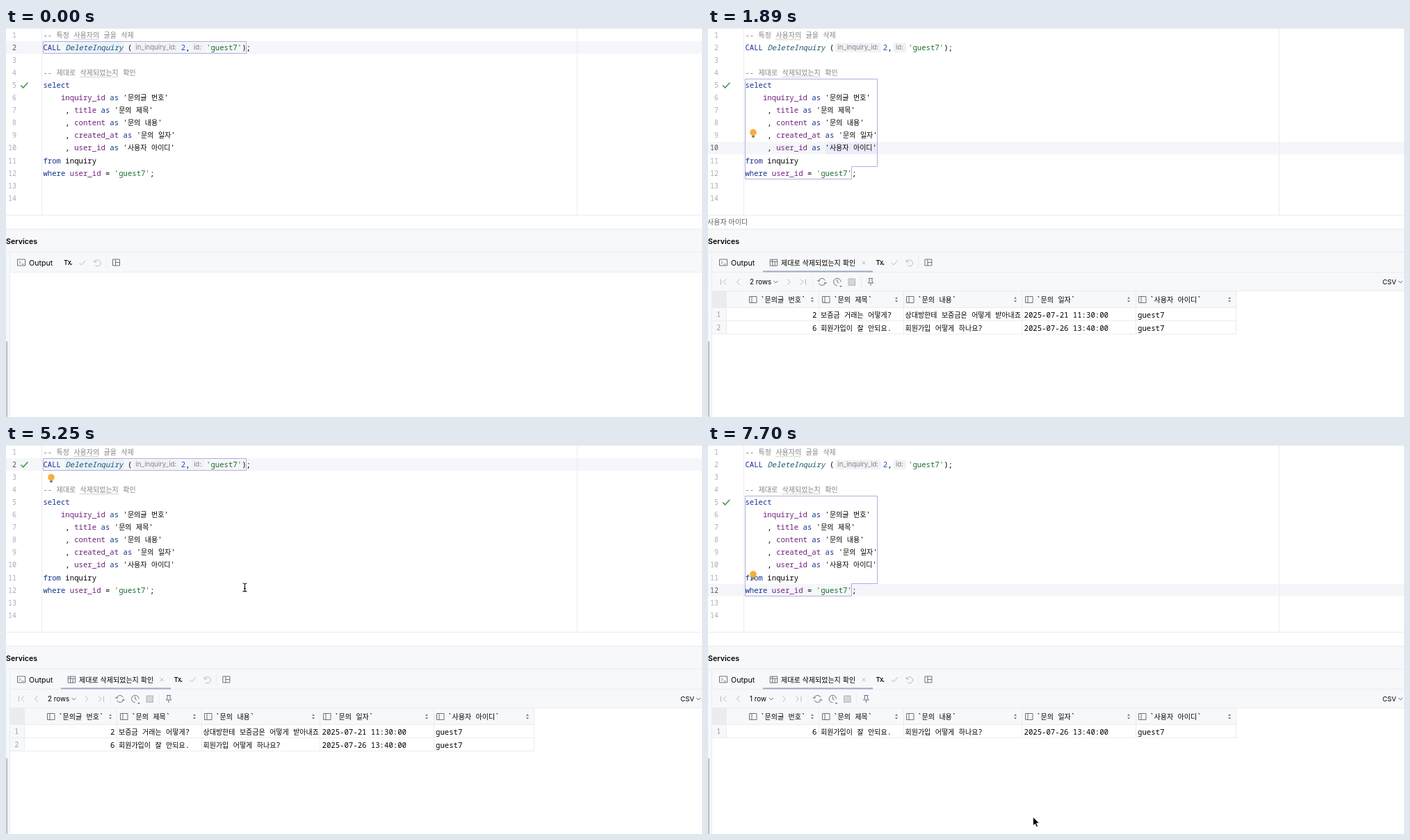
Write an HTML page that moves like this. It is 1001 by 560 pixels and loops after 7770 ms.

```html
<!DOCTYPE html>
<html lang="ko">
<head>
<meta charset="utf-8">
<title>SQL console</title>
<style>
html, body { margin: 0; width: 100%; height: 100%; overflow: hidden; background: #fff }
svg { display: block }
text { white-space: pre; font: 10.67px Inter, 'Noto Sans CJK KR', 'Noto Sans CJK', sans-serif }
.m { font-family: 'Noto Sans Mono', 'Noto Sans CJK KR', 'Noto Sans CJK', monospace; font-weight: 500 }
.h { font-family: 'Noto Sans CJK KR', 'Noto Sans CJK', sans-serif; font-size: 10px; font-weight: 400 }
.k { fill: #14348f } .f { fill: #6f1f7c } .s { fill: #1b6e2c }
.c { fill: #858585; font-weight: 400 }
.i { fill: #17586b; font-style: italic }
.n { font-size: 10px; font-weight: 400; text-anchor: end; fill: #aaadb6 }
.n.on { fill: #555962 }
.hint { font-size: 9.6px; fill: #7f838a }
.b { font-weight: 600 }
.ic { fill: none; stroke: #6c707e }
.off { fill: none; stroke: #b4b8c2 }
#popup { filter: drop-shadow(0 3px 5px #0005) }
</style>
</head>
<body>
<svg id="stage" width="1001" height="560" viewBox="0 0 1001 560"></svg>
<script>
const LOOP = 7770, STEP = 70;
const $ = id => document.getElementById(id);
const lineTop = n => 1 + 18.08 * (n - 1);

const ko = s => s.replace(/[가-힣]+/g, '<tspan class="h">$&</tspan>');
const paint = s => ko(s.replace(
  /\b(CALL|select|as|from|where)\b|(\w+_(?:id|at)|title|content)|(DeleteInquiry)|('guest7')/g,
  (m, ...g) => `<tspan class="${'kfis'[g.findIndex(Boolean)]}">${m}</tspan>`));
const text = (x, y, s, cls = '', extra = '') => `<text x="${x}" y="${y}" class="${cls}" ${extra}>${s}</text>`;
const mono = (x, y, s, cls = '', extra = '') => text(x, y, paint(s), 'm ' + cls, extra);
const rect = (x, y, w, h, fill, extra = '') => `<rect x="${x}" y="${y}" width="${w}" height="${h}" fill="${fill}" ${extra}/>`;
const path = (d, cls = 'ic', extra = '') => `<path d="${d}" class="${cls}" ${extra}/>`;
const group = (id, body) => `<g id="${id}">${body}</g>`;
const hline = (y, x = 0, w = 1001) => rect(x, y, w, 1, '#ebecf0');
const vline = (x, y, h) => rect(x, y, 1, h, '#ebecf0');
const wave = (x, y, w) => path(`M${x} ${y}` + 'q1 -1.6 2 0t2 0'.repeat(w / 4), '', 'fill="none" stroke="#b5c7ae" stroke-width=".8"');

const code = [
  '-- 특정 사용자의 글을 삭제', '', '', '-- 제대로 삭제되었는지 확인', 'select',
  "    inquiry_id as '문의글 번호'", "     , title as '문의 제목'", "     , content as '문의 내용'",
  "     , created_at as '문의 일자'", "     , user_id as '사용자 아이디'",
  'from inquiry', "where user_id = 'guest7';", '', ''];

const editor =
  rect(0, 0, 1001, .6, '#d5d6da') +
  rect(0, 0, 1001, 18, '#f5f6f9', 'id="band"') +
  rect(85, 20, 84, 16, '#e9f0fa', 'id="callMark"') + rect(169, 164.5, 74, 17, '#ecebfa', 'id="nameMark"') +
  path('', '', 'id="sel" fill="#c9c9fe"') +
  vline(51, 0, 269) + vline(821, 0, 269) + hline(269) +
  path('', '', 'id="outline" fill="none" stroke="#b5acdd"') +
  rect(183, 21.5, 66, 13.5, '#f1f2f5', 'rx="3"') + rect(266.5, 21.5, 18.5, 13.5, '#f1f2f5', 'rx="3"') +
  code.map((s, i) => {
    const y = lineTop(i + 1) + 12.7;
    return text(15, y, i + 1, 'm n') + mono(53.4, y, s, s.startsWith('--') ? 'c' : '');
  }).join('') +
  mono(53.4, 31.8, 'CALL DeleteInquiry (') + text(186.5, 31.3, 'in_inquiry_id:', 'hint') +
  mono(251.8, 31.8, '<tspan fill="#1f4fc4">2</tspan>,') + text(270, 31.3, 'id:', 'hint') +
  mono(288, 31.8, "'guest7');") +
  wave(97, 16.5, 36) + wave(106, 70.5, 56) +
  path('M21.3 0l3.4 3.3l6.6 -7.2', '', 'id="check" fill="none" stroke="#4f9a52" stroke-width="1.7"') +
  group('bulb', '<circle r="4.8" cy="-1" fill="#f4af3d"/>' + rect(-2, 3.5, 4, 3, '#8b8176', 'rx="1"')) +
  rect(0, 0, 1.6, 15.5, '#000', 'id="caret"') +
  text(-1, 283, ko('사용자 아이디'), '', 'id="crumb" fill="#5a5d66"');

const table = path('M0 -4.5h10.5v9h-10.5zM0 -1.5h10.5M3.5 -4.5v9M7 -1.5v6');
const tools =
  text(83, 341, 'Tx', '', 'style="font-size:9.5px;font-weight:500"') + path('M92.5 339.5h3l-1.5 2z', '', 'fill="#333"') +
  path('M105.5 338l3 3l6 -6.5M127 333.5v3.5h3.5M127.5 336.5a4.5 4.5 0 1 1 1 5.2', 'off') +
  vline(144, 330, 16) + path('M153.5 333h10v9h-10zM157.5 333v9M157.5 337.5h6');

const services =
  hline(289) + rect(0, 290, 1001, 62, '#f7f8fa') + hline(322) + hline(351) +
  rect(0, 323, 5, 237, '#f7f8fa') + vline(5, 323, 237) + rect(0, 451, 2.4, 109, '#c3c4c8', 'rx="1"') +
  text(0, 310.5, 'Services', 'b') +
  path('M16.5 333h11v9h-11zM19 335.5l2 2l-2 2M22.5 340h3') + text(33, 341.7, 'Output') +
  group('tools', tools) +
  group('tab', rect(79, 349.5, 158, 2, '#9da9c8') + `<g transform="translate(89.2 337.7)">${table}</g>` +
    text(105, 341.7, ko('제대로 삭제되었는지 확인')) + path('M221.5 335.5l5 5m0 -5l-5 5', 'off'));

const heads = [[59.5, 150, '문의글 번호'], [164.5, 271, '문의 제목'], [285.5, 442, '문의 내용'],
  [456.5, 605, '문의 일자'], [619.5, 750, '사용자 아이디']];
const cols = [26, 159, 281, 451, 615, 759];
const record = (n, id, ...cells) => {
  const y = 416.5 + 19 * (n - 1);
  return text(12.3, y - .2, n, 'm', 'fill="#9a9eaa" style="font-size:10px"') +
    mono(156.5, y, id, '', 'text-anchor="end"') +
    cells.map((s, i) => text([162, 283.5, 454.5, 618][i], y, ko(s), 'm', i == 1 ? 'clip-path="url(#cell)"' : '')).join('');
};
const frame = n => rect(6, 403, 20, 19 * n, '#f7f8fa') +
  cols.map(x => vline(x, 378, 25 + 19 * n)).join('') +
  [402, 421, 440].slice(0, n + 1).map(y => hline(y, 6, 754)).join('');
const second = ['6', '회원가입이 잘 안되요.', '회원가입 어떻게 하나요?', '2025-07-26 13:40:00', 'guest7'];

const results =
  '<clipPath id="cell"><rect x="281" y="400" width="169" height="45"/></clipPath>' +
  rect(6, 352, 995, 26, '#f7f8fa') + rect(6, 378, 754, 25, '#f7f8fa') + rect(6, 378, 20, 25, '#ebecf0') + hline(378, 6, 995) +
  path('M18.5 361.5v8M26 361.5l-4 4l4 4M45.5 361.5l-4 4l4 4', 'off') +
  text(60, 369, '', '', 'id="count" style="font-size:9.8px"') +
  group('nav', path('M94.5 364l3 3l3 -3') +
    path('M114 361.5l4 4l-4 4M133 361.5l4 4l-4 4M140.5 361.5v8', 'off') + vline(150, 358, 16) +
    path('M159 364.5a5 5 0 0 1 9.5 -1M169 366.5a5 5 0 0 1 -9.5 1M157 363l2 2l2.3 -1.5M171 368l-2 -2l-2.3 1.5') +
    path('M191 365.5a5.2 5.2 0 1 0 -5.2 5.2M185.8 362v3.8l2.5 1.5') + path('M189 371h4l-2 2z', '', 'fill="#6c707e"') +
    rect(202, 361, 9.5, 9.5, '#d3d5db', 'stroke="#b4b8c2"') + vline(220, 358, 16) +
    path('M231 360.5h6M232 360.5v4.5l-2 2h8l-2 -2v-4.5M234 367v4')) +
  text(970, 369, 'CSV', '', 'style="font-size:9.6px"') + path('M993 364l3 3l3 -3') +
  heads.map(([x, s, name]) =>
    path(`M${x} 386.5h10.5v9h-10.5zM${x + 3.5} 386.5v9`) + mono(x + 15.7, 394.5, '`' + name + '`') +
    path(`M${s - 2} 389.8l2 -2.5l2 2.5zM${s - 2} 392.2l2 2.5l2 -2.5z`, '', 'fill="#6c707e"')).join('') +
  group('two', frame(2) + record(1, '2', '보증금 거래는 어떻게?', '상대방한테 보증금은 어떻게 받아내죠?', '2025-07-21 11:30:00', 'guest7') + record(2, ...second)) +
  group('one', frame(1) + record(1, ...second));

const spinner = Array.from({ length: 8 }, (_, i) =>
  `<path d="M0 -5V-9.5" transform="rotate(${45 * i})" stroke="#6c707e" stroke-width="2.2" stroke-linecap="round" opacity="${.2 + i * .1}"/>`).join('');

const popup = rect(0, 0, 290.5, 93.5, '#fff', 'rx="6" stroke="#c4c6cc" stroke-width=".6"') +
  rect(.3, 31.5, 290, 20, '#d4e2ff') +
  path('M.3 77.5h290v10q0 6 -6 6h-278q-6 0 -6 -6z', '', 'fill="#f7f8fa"') +
  text(147, 20, 'Statements', 'b', 'text-anchor="middle"') + text(1, 45.7, '', '', 'id="first"') +
  text(1, 65.7, ko("-- 특정 사용자의 글을 삭제 CALL DeleteInquiry (2,'guest7'); ...")) +
  text(2.5, 89, 'Customize', '', 'fill="#315fbd"');

const mouse =
  '<circle id="ring" r="13.3" fill="#fff" fill-opacity=".6" stroke="#111" stroke-width="1.4"/>' +
  path('M-3 -6q2.5 0 3 1.2q.5 -1.2 3 -1.2M0 -5V5M-3 6q2.5 0 3 -1.2q.5 1.2 3 1.2M-1.5 1.5h3', '', 'id="beam" fill="none" stroke="#111" stroke-width="1.2"') +
  path('M0 0V12.5l2.9 -2.6l2 4.5l2.1 -1l-2 -4.3h3.8z', '', 'id="arrow" fill="#000" stroke="#fff" stroke-width=".8"');

$('stage').innerHTML = editor + services + group('results', results) + group('spin', spinner) +
  group('popup', popup) + group('mouse', mouse);

// Mouse trips: [time, x, y] points; the last time hides the pointer.
const trips = [
  [[70, 495, 485], [210, 425, 330], [350, 330, 176], [490, 330, 176]],
  [[2520, 335, 204], [2660, 362, 150], [2870, 428, 28], [2940, 429.3, 25.5], [3010, 442, 21], [3080, 442, 20]],
  [[4760, 442, 20], [4900, 461, 16], [5110, 395, 130], [5250, 343.5, 205], [5460, 343.5, 206], [5530, 343.5, 206]],
  [[7350, 343.5, 206], [7490, 385, 320], [7630, 455, 505], [7700, 467.5, 535.5], [7770, 467.5, 535.5]]];

const mouseAt = t => {
  const trip = trips.find(p => t >= p[0][0] && t < p.at(-1)[0]);
  if (!trip) return null;
  const i = trip.findIndex(p => p[0] > t), [t0, x0, y0] = trip[i - 1], [t1, x1, y1] = trip[i];
  const k = (t - t0) / (t1 - t0);
  return [x0 + (x1 - x0) * k, y0 + (y1 - y0) * k];
};

const show = (id, on) => $(id).style.display = on ? '' : 'none';
const move = (id, x, y) => $(id).setAttribute('transform', `translate(${x} ${y})`);
const place = (id, pos) => { show(id, pos); if (pos) move(id, ...pos); };
const numbers = document.querySelectorAll('.n');
const callBox = 'M53.5 19.5H345.5V36.5H53.5Z';
const queryBox = 'M53.5 73.5H243.5V199.5H206.5V217.5H53.5Z';

function draw(t) {
  const within = (a, b) => t >= a && t < b;
  const line = t < 420 ? 2 : t < 3010 ? 10 : t < 5460 ? 2 : 12;
  const picked = within(1400, 1820) || within(6020, 6580), called = within(3640, 4130);

  $('band').setAttribute('y', lineTop(line));
  numbers.forEach((n, i) => n.classList.toggle('on', i + 1 == line));
  show('callMark', line == 2 && !called);
  show('nameMark', line == 10 && !picked);
  $('sel').setAttribute('d', picked ? 'M53 73H1001V199.5H207V218H53Z' : called ? 'M53 19H346V37H53Z' : '');
  $('outline').setAttribute('d', within(1050, 3430) || t >= 5810 ? queryBox : callBox);
  move('check', 0, within(4130, 6580) ? 28.5 : 82.7);
  place('bulb', within(700, 1400) || within(1820, 3010) ? [65, 151.3]
    : within(4130, 5460) ? [65, 47.5] : t >= 7350 && [65, 187]);
  place('caret', within(490, 1050) || within(2380, 3010) ? [242.5, lineTop(10) + 1]
    : within(3080, 3640) ? [351.5, lineTop(2) + 1] : within(5530, 5810) && [212.5, lineTop(12) + 1]);
  show('crumb', within(630, 3220));

  move('tools', t < 1820 ? 0 : 158.4, 0);
  show('tab', t >= 1820);
  show('results', t >= 1890);
  show('two', t < 6580);
  show('one', t >= 6580);
  $('count').textContent = t < 6720 ? '2 rows' : '1 row';
  move('nav', t < 6720 ? 0 : -6.5, 0);
  show('spin', within(1960, 2380) || within(6580, 7000));
  $('spin').setAttribute('transform', `translate(567 494.5) rotate(${Math.floor(t / 140) * 45})`);

  place('popup', within(1400, 1750) ? [242.7, 181.8] : within(3640, 4060) ? [351.5, 68] : within(6020, 6510) && [213.3, 217.8]);
  $('first').innerHTML = ko(called ? "CALL DeleteInquiry (2,'guest7')" : "select inquiry_id as '문의글 번호' , title as '문의 제목' ,...");

  const pos = mouseAt(t);
  place('mouse', pos);
  if (pos) {
    show('arrow', pos[1] > 269);
    show('beam', pos[1] <= 269);
    show('ring', within(350, 420) || within(2940, 3010) || within(5390, 5460));
  }
}

const start = performance.now();
function tick() {
  const t = (performance.now() - start) % LOOP;
  draw(Math.floor(t / STEP) * STEP);
  requestAnimationFrame(tick);
}
tick();
</script>
</body>
</html>
```
